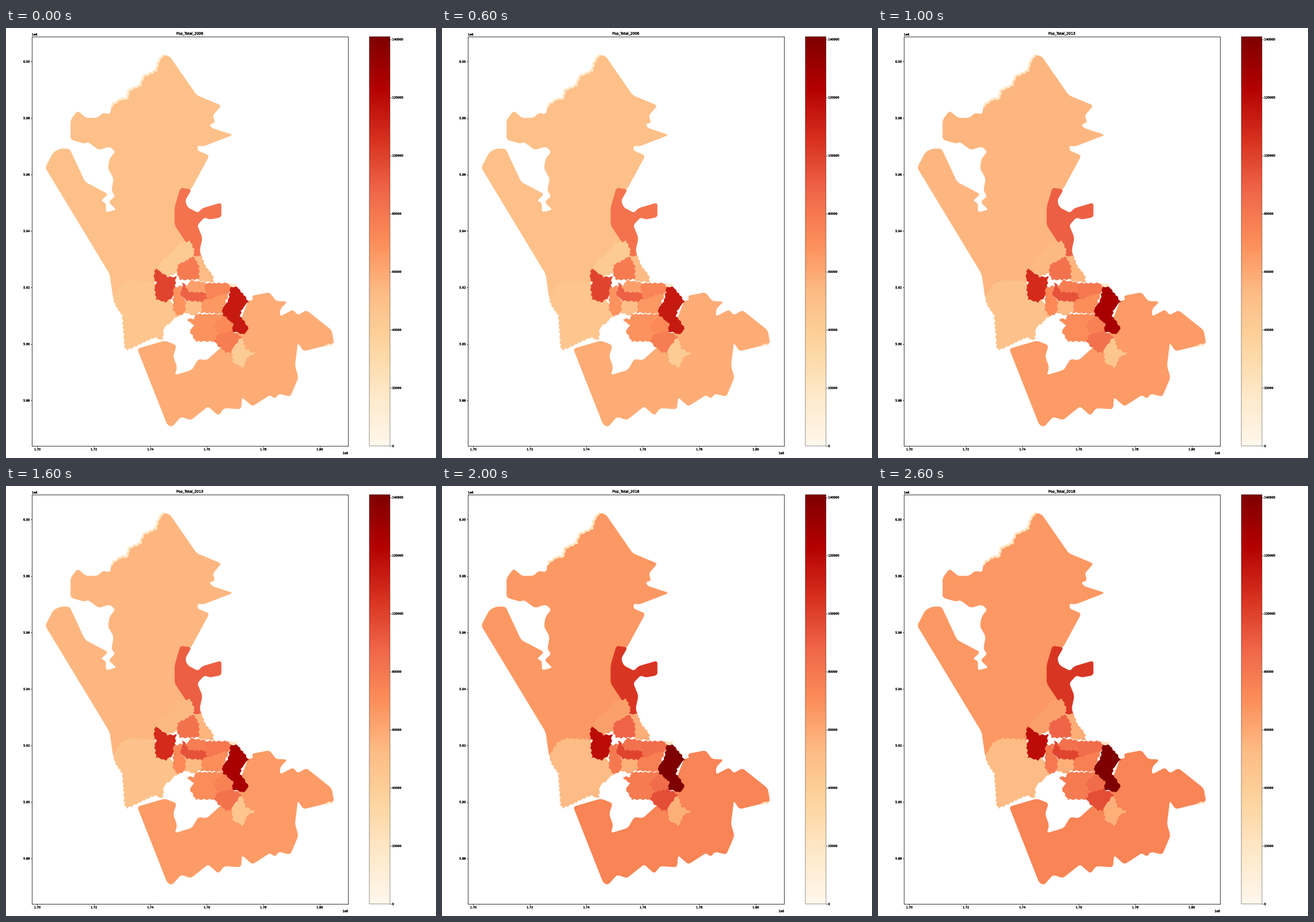
A matplotlib script that plays this animation: 748x748 px, repeating every 3 s.

```python
import matplotlib.pyplot as plt
import numpy as np
from matplotlib import patheffects
from matplotlib.animation import FuncAnimation
from matplotlib.cm import ScalarMappable
from matplotlib.colors import Normalize
from matplotlib.patches import PathPatch
from matplotlib.path import Path
from matplotlib.text import Text

STAGE = 748
DPI = STAGE / 20
PX = 72 / DPI  # points per pixel
YEARS = (2006, 2013, 2018)
LEFT, RIGHT, TOP, BOTTOM = 45, 595, 14.6, 727
M_PER_PX = 20000 / 98.25

plt.rcParams.update({
    "font.family": "DejaVu Sans", "font.size": 9.75,
    "axes.linewidth": 1.5, "xtick.major.width": 1.5, "ytick.major.width": 1.5,
})


def geo(points):
    """Stage pixels to map metres."""
    x, y = np.array(points, float).T
    return np.column_stack([1.70e6 + (x - 55) * M_PER_PX,
                            6.00e6 - (y - 58.3) * M_PER_PX])


def box(left, top, right, bottom):
    return [left / STAGE, 1 - bottom / STAGE,
            (right - left) / STAGE, (bottom - top) / STAGE]


def ragged(points):
    """Subdivide a line and ripple it; shared borders ripple alike."""
    pts = np.array(points, float)
    parts = [np.linspace(a, b, max(2, int(np.hypot(*(b - a)))))
             for a, b in zip(pts, pts[1:])]
    x, y = np.vstack(parts).T
    return np.column_stack([x + np.sin(0.75 * y + 0.2 * x),
                            y + np.sin(0.7 * x - 0.25 * y)])


def rounded(points, radius=5):
    """Closed path with each corner cut by a curve."""
    pts = geo(points)
    verts = []
    for before, corner, after in zip(np.roll(pts, 1, 0), pts, np.roll(pts, -1, 0)):
        for i, other in enumerate((before, after)):
            way = other - corner
            cut = min(0.5, radius * M_PER_PX / np.hypot(*way))
            verts += [corner + cut * way] if i == 0 else [corner, corner + cut * way]
    codes = [Path.LINETO, Path.CURVE3, Path.CURVE3] * len(pts)
    codes[0] = Path.MOVETO
    return Path(verts + [verts[0]], codes + [Path.CLOSEPOLY])


fig = plt.figure(figsize=(20, 20), dpi=DPI, facecolor="white")
ax = fig.add_axes(box(LEFT, TOP, RIGHT, BOTTOM))
(x0, y0), (x1, y1) = geo([(LEFT + 0.5, BOTTOM), (RIGHT + 0.5, TOP)])
ax.set(xlim=(x0, x1), ylim=(y0, y1),
       xticks=np.arange(1.70e6, 1.81e6, 2e4),
       yticks=np.arange(5.88e6, 6.01e6, 2e4))
title = ax.set_title("")

shade = ScalarMappable(Normalize(0, 140970), "OrRd")
cax = fig.add_axes(box(632, TOP, 668, BOTTOM))
bar = fig.colorbar(shade, cax=cax, ticks=range(0, 140001, 20000))
bar.outline.set_linewidth(0.8)

areas = []


def add(path, populations):
    patch = ax.add_patch(PathPatch(path, lw=0.4 * PX, joinstyle="round"))
    areas.append((patch, populations))


def coast(populations, points):
    add(rounded(points), populations)


def board(populations, points):
    add(Path(geo(ragged(points + points[:1]))), populations)


def sliver(points, width):
    line, = ax.plot(*geo(ragged(points)).T, lw=width * PX, zorder=1.5,
                    solid_capstyle="butt")
    areas.append((line, (18000, 19500, 22000)))


# Rodney
ridge = [(184, 136), (198, 124), (211, 122), (214, 109), (234, 99),
         (240, 84), (262, 73), (265, 58), (274, 47)]
east = [(285, 49), (332, 117), (375, 135), (360, 152), (364, 165), (354, 167),
        (358, 174), (395, 186), (343, 206), (334, 204), (333, 213), (354, 222),
        (322, 281), (305, 290), (300, 330), (320, 375), (290, 415), (255, 446),
        (187, 470)]
west = [(181, 428), (69, 243), (83, 216), (95, 210), (111, 210), (138, 268),
        (178, 289), (165, 301), (174, 304), (174, 321), (193, 316), (179, 303),
        (191, 292), (184, 284), (188, 262), (178, 244), (181, 227), (191, 215),
        (181, 206), (162, 212), (143, 198), (137, 201), (113, 194), (113, 160),
        (125, 144), (140, 157), (161, 156), (168, 148), (182, 150)]
coast((49384, 54879, 66417), ridge + east + west)
sliver(ridge, 3.5)

# Franklin
north_shore = [
    (229, 558), (277, 544), (297, 552), (291, 571), (298, 590), (294, 604),
    (324, 595), (335, 576), (350, 578), (372, 558), (400, 540), (412, 500),
    (422, 474), (431, 474), (428, 466), (459, 460), (470, 475), (490, 476),
    (477, 489), (477, 502), (500, 490), (508, 500), (523, 491), (567, 526)]
south_shore = [
    (571, 549), (518, 562), (508, 547), (503, 588), (509, 608), (495, 641),
    (475, 636), (468, 645), (460, 638), (429, 658), (411, 642), (409, 663),
    (380, 661), (370, 674), (352, 658), (322, 682), (305, 676), (289, 694),
    (281, 690)]
coast((58600, 65322, 74838), north_shore + south_shore)
sliver([(556, 553), (570, 550)], 3)
sliver([(390, 447), (401, 448)], 5)

# Hibiscus and Bays
coast((81800, 89831, 104010), [
    (304, 278), (323, 281), (312, 300), (316, 312), (335, 322), (341, 314),
    (375, 304), (375, 329), (354, 333), (346, 329), (333, 343), (342, 365),
    (337, 388), (341, 398), (326, 397), (312, 370), (294, 343), (294, 312)])
# Waitakere Ranges
board((45500, 48396, 52095), [
    (187, 470), (201, 447), (215, 439), (256, 441), (285, 470), (300, 500),
    (275, 522), (273, 543), (260, 538), (211, 560), (207, 555), (203, 501),
    (191, 481)])
# Devonport-Takapuna
board((52600, 55470, 57975), [
    (327, 397), (341, 397), (347, 413), (361, 433), (361, 442), (337, 440)])
# Kaipatiki
board((78207, 82494, 88269), [
    (299, 412), (326, 397), (336, 415), (336, 437), (304, 438), (298, 426)])
# Upper Harbour
board((42900, 53670, 62841), [
    (300, 374), (321, 371), (328, 386), (326, 397), (299, 412), (298, 426),
    (281, 433), (264, 416), (272, 404), (293, 387)])
# Henderson-Massey
board((98800, 107685, 118422), [
    (260, 418), (281, 433), (296, 433), (293, 465), (279, 477), (262, 472),
    (259, 452), (262, 442), (258, 436)])
# Whau
board((68800, 72594, 79356), [
    (292, 452), (306, 448), (304, 465), (317, 480), (312, 495), (300, 501),
    (291, 490)])
# Puketapapa
board((50400, 52938, 57555), [
    (314, 474), (341, 476), (339, 494), (328, 500), (312, 495)])
# Maungakiekie-Tamaki
board((66300, 70002, 76284), [
    (341, 472), (365, 462), (389, 460), (379, 484), (378, 497), (340, 495)])
# Albert-Eden
board((89600, 94695, 98622), [
    (308, 444), (314, 449), (320, 459), (350, 460), (352, 468), (341, 476),
    (314, 474), (304, 465)])
# Orakei
board((74500, 79536, 84318), [
    (348, 444), (386, 444), (393, 449), (389, 460), (372, 464), (352, 473),
    (345, 455)])
# Waitemata
board((62900, 77136, 82866), [
    (313, 449), (323, 439), (348, 443), (345, 455), (350, 460), (320, 459)])
# Mangere-Otahuhu
board((67900, 70959, 78450), [
    (316, 506), (329, 506), (329, 498), (384, 498), (384, 530), (362, 545),
    (331, 545), (320, 528), (327, 518)])
# Otara-Papatoetoe
board((72500, 75663, 85122), [
    (372, 506), (384, 500), (396, 514), (394, 528), (372, 534), (361, 520)])
# Manurewa
board((77200, 82242, 95670), [
    (370, 533), (394, 527), (411, 537), (393, 564), (382, 564), (362, 545)])
# Howick
board((113500, 127125, 140970), [
    (392, 449), (404, 451), (422, 476), (410, 490), (408, 502), (423, 522),
    (414, 533), (394, 527), (396, 514), (378, 499), (377, 488), (387, 475)])
# Papakura
board((41600, 45636, 57636), [
    (411, 537), (417, 558), (433, 566), (419, 574), (413, 591), (396, 582),
    (393, 560)])

# Heavier strokes keep the tiny lettering dark
fig.canvas.draw()
for text in fig.findobj(Text):
    text.set_path_effects([patheffects.withStroke(linewidth=0.6, foreground="black")])


def update(i):
    title.set_text(f"Pop_Total_{YEARS[i]}")
    for artist, populations in areas:
        artist.set_color(shade.to_rgba(populations[i]))
    return [title] + [artist for artist, _ in areas]


anim = FuncAnimation(fig, update, frames=len(YEARS), interval=1000,
                     repeat=True, repeat_delay=0, blit=False)
plt.show()
```
